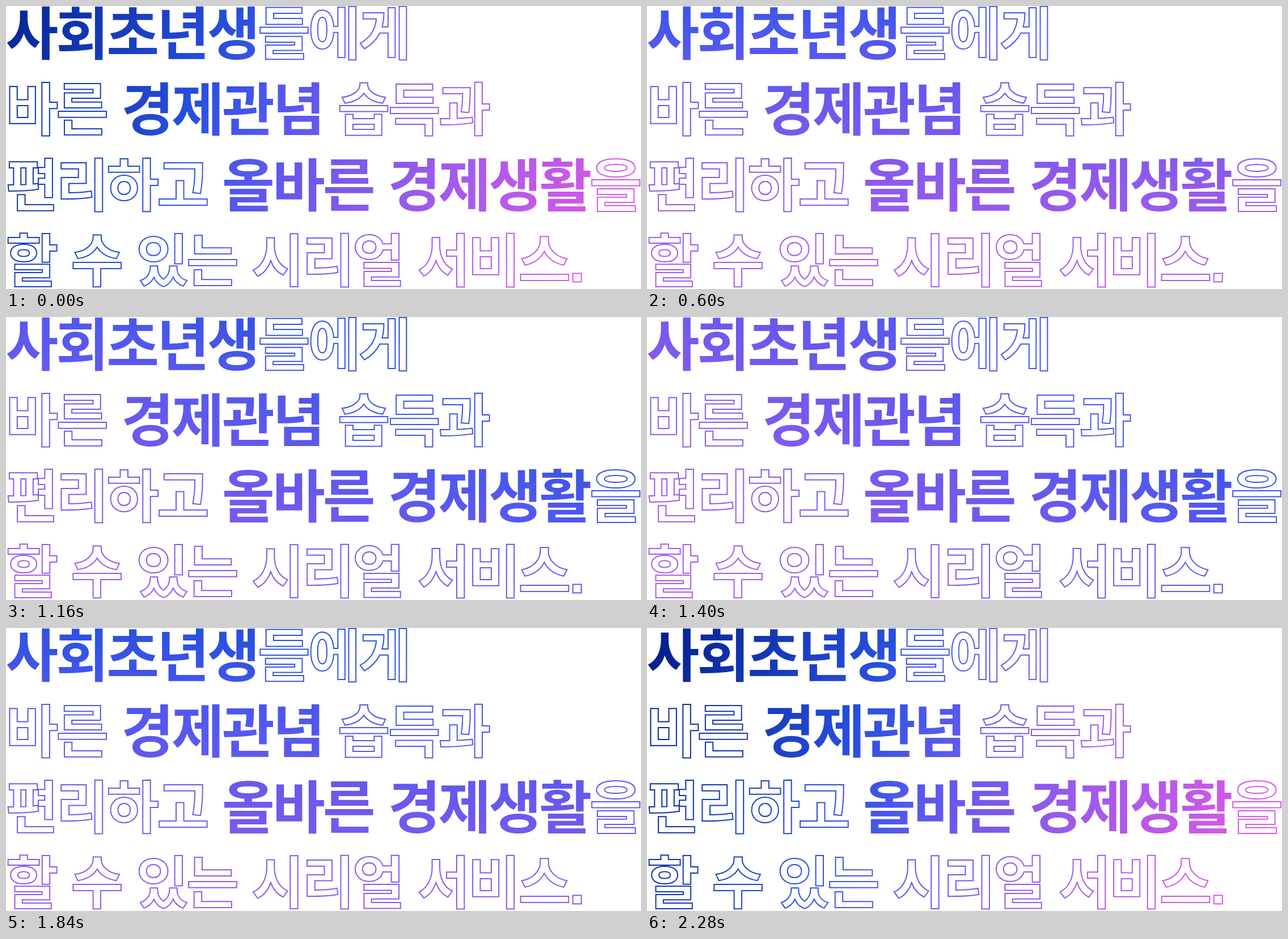
Write an HTML page with a canvas that moves like this. It is 1120 px wide and 500 px high and loops after 2600 ms.

```html
<!DOCTYPE html>
<html lang="ko">
<head>
<meta charset="utf-8">
<title>사회초년생</title>
<style>
  html, body { margin: 0; width: 100%; height: 100%; overflow: hidden; background: #fff; }
  canvas { display: block; }
</style>
</head>
<body>
<canvas id="stage" width="1120" height="500"></canvas>
<script>
const ctx = document.getElementById('stage').getContext('2d');

const LOOP = 2600;
const STEP = 40;
const FONT = '700 101px "Noto Sans CJK KR", "Noto Sans KR", "Noto Sans CJK JP", "Noto Sans CJK", sans-serif';
const LEFT = -0.6;
const MIDDLE = 48.3;
const LEADING = 133.7;
const GLYPH = 88.9;
const SPACE = 26;

// Words between asterisks are solid, the rest is outlined.
const LINES = [
  '*사회초년생*들에게',
  '바른 *경제관념* 습득과',
  '편리하고 *올바른* *경제생활*을',
  '할 수 있는 시리얼 서비스.'
];

const STOPS = [
  [0, '#001e88'],
  [0.33, '#2850de'],
  [0.42, '#5058ee'],
  [0.65, '#9c5aec'],
  [0.87, '#d657e9'],
  [1, '#ee5ae8']
];

// Gradient value at the top left corner, and its slope per 1000 px across and down.
const KEYS = [
  { time: 0,    pose: [0.045, 0.68, 0.32],  power: 1.2 },
  { time: 200,  pose: [0.21, 0.46, 0.45],   power: 1.6 },
  { time: 600,  pose: [0.375, 0.02, 0.7],   power: 1.7 },
  { time: 1160, pose: [0.45, -0.21, 0.5],   power: 1.7 },
  { time: 1680, pose: [0.6, -0.28, 0.3],    power: 1 },
  { time: 1840, pose: [0.345, -0.05, 0.62], power: 1.6 },
  { time: 2280, pose: [0, 0.745, 0.28],     power: 1 }
];

const easeOut = (u, power) => 1 - Math.pow(1 - u, power);

function poseAt(time) {
  const next = KEYS.findIndex(key => key.time > time);
  if (next < 0) return KEYS[KEYS.length - 1].pose;
  const a = KEYS[next - 1];
  const b = KEYS[next];
  const u = easeOut((time - a.time) / (b.time - a.time), a.power);
  return a.pose.map((v, i) => v + (b.pose[i] - v) * u);
}

function makeGradient([corner, across, down]) {
  const gx = across / 1000;
  const gy = down / 1000;
  const norm = gx * gx + gy * gy;
  const vx = gx / norm;
  const vy = gy / norm;
  const x = -corner * vx;
  const y = -corner * vy;
  const gradient = ctx.createLinearGradient(x, y, x + vx, y + vy);
  STOPS.forEach(([at, color]) => gradient.addColorStop(at, color));
  return gradient;
}

// Distance from the middle of a full-height syllable down to the baseline.
function baselineOffset() {
  const box = ctx.measureText('이');
  return (box.actualBoundingBoxAscent - box.actualBoundingBoxDescent) / 2;
}

function drawLine(text, middle, offset) {
  let x = LEFT;
  let solid = false;
  for (const ch of text) {
    if (ch === '*') {
      solid = !solid;
    } else if (ch === ' ') {
      x += SPACE;
    } else if (ch === '.') {
      // The full stop is square.
      ctx.strokeRect(x + 7.4, middle + 23, 15, 15);
    } else {
      if (solid) ctx.fillText(ch, x, middle + offset);
      else ctx.strokeText(ch, x, middle + offset);
      x += GLYPH;
    }
  }
}

function draw(time) {
  ctx.fillStyle = '#fff';
  ctx.fillRect(0, 0, 1120, 500);
  ctx.font = FONT;
  ctx.textBaseline = 'alphabetic';
  ctx.lineWidth = 2;
  ctx.lineJoin = 'miter';
  ctx.miterLimit = 4;
  ctx.fillStyle = ctx.strokeStyle = makeGradient(poseAt(time));
  const offset = baselineOffset();
  LINES.forEach((text, i) => drawLine(text, MIDDLE + i * LEADING, offset));
}

const start = performance.now();

function frame() {
  const time = (performance.now() - start) % LOOP;
  draw(Math.floor(time / STEP) * STEP);
  requestAnimationFrame(frame);
}

frame();
</script>
</body>
</html>
```
